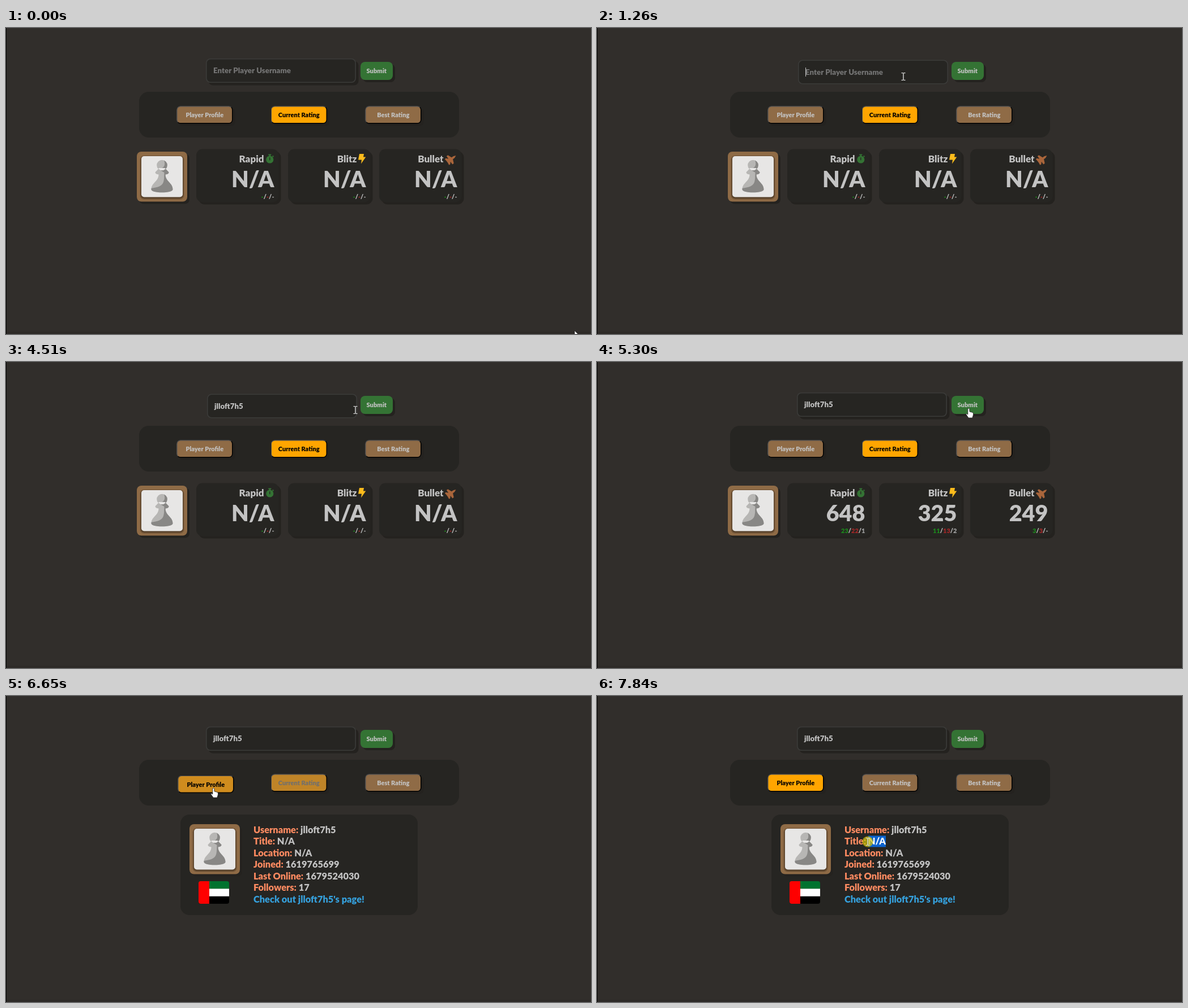
An HTML page with a canvas for the animation above (8000 ms loop, 1033x542 px).

```html
<!DOCTYPE html>
<html lang="en">
<head>
<meta charset="utf-8">
<title>Player ratings</title>
<style>
html, body { margin: 0; width: 100%; height: 100%; overflow: hidden; background: #312e2b; }
canvas { display: block; width: 1033px; height: 542px; }
</style>
</head>
<body>
<canvas id="stage" width="1033" height="542"></canvas>
<script>
const W = 1033, H = 542, LOOP = 8000;
const view = document.getElementById('stage').getContext('2d', { alpha: false, willReadFrequently: true });
let ctx = view;
const USER = 'jlloft7h5';
const PANEL = '#262522', SHADE = '#24221f', LIGHT = '#c3c3c3';
const BROWN = [143, 107, 70], ORANGE = [255, 165, 0], BLACK = [0, 0, 0], GREY = [195, 195, 195];

const KEYS = [2330, 2530, 2660, 2860, 3060, 3190, 3720, 3850, 3980];
const MARKS = [0, 70, 1740, 2200, ...KEYS, 4510];
const FOCUS = 950, BLUR = 4900, RESULT = 5230, SWITCH = 6520, RELEASE = 6720, DRAG = 7450;

// time, x, y
const PATH = [
  [70, 1004, 536], [850, 556, 80], [920, 556, 80], [1260, 541, 86], [1400, 541, 86], [1740, 617, 85],
  [4510, 617, 85], [4840, 656, 82], [5500, 656, 82], [5920, 438, 152], [6250, 366, 163],
  [6720, 366, 163], [7320, 529, 268], [DRAG, 529, 268], [7840, 478, 258]
];

const clamp = v => Math.max(0, Math.min(1, v));
const mix = (a, b, p) => a + (b - a) * p;
const easeOut = p => 1 - (1 - clamp(p)) ** 2;
const easeBoth = p => p * p * (3 - 2 * p);
const blend = (a, b, p) => 'rgb(' + a.map((v, i) => Math.round(mix(v, b[i], p))) + ')';

// paints a still part once and reuses it
const layers = {};
function still(key, paint) {
  if (!layers[key]) {
    const c = document.createElement('canvas');
    c.width = W;
    c.height = H;
    const outer = ctx;
    ctx = c.getContext('2d', { willReadFrequently: true });
    paint();
    ctx = outer;
    layers[key] = c;
  }
  ctx.drawImage(layers[key], 0, 0);
}

function box(x, y, w, h, r, fill) {
  ctx.beginPath();
  ctx.roundRect(x, y, w, h, r);
  ctx.fillStyle = fill;
  ctx.fill();
}

function shadowBox(x, y, w, h, r, fill, drop) {
  if (drop > 0.05) box(x + drop, y + drop, w, h, r, SHADE);
  box(x, y, w, h, r, fill);
}

function poly(points, fill, stroke) {
  ctx.beginPath();
  points.forEach(([x, y]) => ctx.lineTo(x, y));
  ctx.closePath();
  ctx.fillStyle = fill;
  ctx.fill();
  if (stroke) {
    ctx.strokeStyle = stroke;
    ctx.lineWidth = 0.8;
    ctx.stroke();
  }
}

function setFont(size) {
  ctx.font = `900 ${size}px Lato, "Open Sans", sans-serif`;
}

function text(str, x, y, size, fill, align = 'left') {
  setFont(size);
  ctx.textAlign = align;
  ctx.fillStyle = fill;
  ctx.fillText(str, x, y);
  return ctx.measureText(str).width;
}

function drawInput(t) {
  const p = t < BLUR ? easeOut((t - FOCUS) / 260) : 1 - easeOut((t - BLUR) / 260);
  const x = 353 + 2 * p, y = 54 + 2.5 * p;
  shadowBox(x, y, 265, 43, 8, '#3b3b39', 4.5 * (1 - p));
  box(x + 1.6, y + 1.6, 261.8, 39.8, 6.5, PANEL);
  const typed = USER.slice(0, KEYS.filter(k => t >= k).length);
  const tx = x + 13, ty = y + 26.4;
  const w = typed ? text(typed, tx, ty, 13.3, LIGHT) : 0;
  if (!typed) text('Enter Player Username', tx, ty, 13.3, '#757575');
  const caret = t >= FOCUS && t < 1470 || t >= 2200 && t < 4510;
  if (caret) {
    ctx.fillStyle = LIGHT;
    ctx.fillRect(Math.round(tx + w), Math.round(y + 13.5), 1, 16);
  }
}

function drawSubmit(t) {
  const p = t < BLUR + 140 ? easeOut((t - BLUR) / 100) : 1 - easeOut((t - BLUR - 140) / 200);
  const x = 626 + 2 * p, y = 60 + 2.5 * p;
  shadowBox(x, y, 57, 32, 8, '#347334', 4 * (1 - p));
  text('Submit', x + 28.3, y + 20, 11.2, LIGHT, 'center');
}

function drawTab(label, x, y, fill, ink, press) {
  x += 2 * press;
  y += 2.5 * press;
  shadowBox(x, y, 99.5, 31.5, 7, '#000', 4 * (1 - press));
  // bevel: grey on the top and left edges
  ctx.save();
  ctx.beginPath();
  ctx.moveTo(x, y);
  ctx.lineTo(x + 99.5, y);
  ctx.lineTo(x + 95, y + 4);
  ctx.lineTo(x + 4, y + 27.5);
  ctx.lineTo(x, y + 31.5);
  ctx.clip();
  box(x, y, 99.5, 31.5, 7, '#4c4c4c');
  ctx.restore();
  box(x + 1.5, y + 1.5, 96.5, 28.5, 5.5, fill);
  text(label, x + 49.8, y + 20.3, 11, ink, 'center');
}

function drawTabs(t) {
  const p = easeOut((t - SWITCH - 10) / 350);
  const press = t < RELEASE ? easeOut((t - SWITCH) / 90) : 1 - easeOut((t - RELEASE) / 250);
  drawTab('Player Profile', 301, 138, blend(BROWN, ORANGE, p), t < SWITCH ? LIGHT : '#000', press);
  drawTab('Current Rating', 467.5, 138, blend(ORANGE, BROWN, p), blend(BLACK, GREY, p), 0);
}

function pawnShape() {
  ctx.beginPath();
  ctx.arc(0, -20, 9.3, 0, 7);
  ctx.moveTo(-5, -15);
  ctx.lineTo(-12, -7.5);
  ctx.quadraticCurveTo(-12, -4, -6, -3.5);
  ctx.bezierCurveTo(-6, 9, -19, 11, -19, 23);
  ctx.bezierCurveTo(-19, 30, 19, 30, 19, 23);
  ctx.bezierCurveTo(19, 11, 6, 9, 6, -3.5);
  ctx.quadraticCurveTo(12, -4, 12, -7.5);
  ctx.lineTo(5, -15);
}

function drawAvatar(x, y) {
  shadowBox(x, y, 89, 88.5, 8, '#8f6b46', 4);
  for (let g = 3; g >= 0; g--) box(x + 8 - g, y + 9.5 - g, 73 + 2 * g, 72.5 + 2 * g, 5 + g, 'rgba(0,0,0,.13)');
  box(x + 8, y + 8, 73, 72.5, 5, '#e7e6e5');
  ctx.save();
  ctx.translate(x + 44.5, y + 44);
  pawnShape();
  ctx.fillStyle = '#b7b6b4';
  ctx.fill();
  ctx.clip();
  ctx.beginPath();
  ctx.moveTo(3, -30);
  ctx.bezierCurveTo(7, -20, 4, -15, -6, -13);
  ctx.lineTo(4, -7);
  ctx.bezierCurveTo(3, 10, 6, 18, -20, 21);
  ctx.lineTo(-20, 32);
  ctx.lineTo(22, 32);
  ctx.lineTo(22, -30);
  ctx.fillStyle = '#888785';
  ctx.fill();
  ctx.restore();
}

function stopwatch() {
  ctx.fillStyle = '#347334';
  ctx.beginPath();
  ctx.arc(465.8, 233, 6.6, 0, 7);
  ctx.fill();
  ctx.fillRect(463.3, 223.5, 5, 2);
  ctx.fillRect(464.8, 224, 2, 4);
  poly([[470, 227], [471.5, 225.8], [473, 227.5], [471.5, 229]], '#347334');
  ctx.fillStyle = PANEL;
  ctx.fillRect(465.1, 229.2, 1.4, 5);
}

function bolt() {
  poly([[624, 223], [632, 223], [631, 228.5], [635.3, 228.5], [627, 240.5], [628, 233.5], [622, 233.5]], '#fcbb1c');
}

function jet() {
  ctx.save();
  ctx.translate(785.5, 232.5);
  ctx.rotate(-0.62);
  const half = [[11, 0], [7, 1.8], [3, 2], [0, 9], [-3, 9], [-3, 3], [-6, 6.5], [-8.5, 6.5], [-8, 1.5]];
  poly(half.concat(half.slice().reverse().map(([x, y]) => [x, -y])), '#a9653b');
  ctx.restore();
}

function drawRecord(parts, right, y) {
  const inks = ['#1c8a1c', LIGHT, '#a52828', LIGHT, '#a0a0a0'];
  const runs = [parts[0], '/', parts[1], '/', parts[2]];
  setFont(11);
  let x = right - ctx.measureText(runs.join('')).width;
  runs.forEach((s, i) => { x += text(s, x, y, 11, inks[i]); });
}

const CARDS = [
  { x: 336, title: 'Rapid', end: 455.5, icon: stopwatch, score: '648', record: ['23', '22', '1'] },
  { x: 498, title: 'Blitz', end: 619.5, icon: bolt, score: '325', record: ['11', '13', '2'] },
  { x: 659, title: 'Bullet', end: 772.5, icon: jet, score: '249', record: ['3', '3', '-'] }
];

function drawRatings(done) {
  drawAvatar(231, 219);
  for (const c of CARDS) {
    shadowBox(c.x, 214.5, 145.5, 94, 11, PANEL, 4);
    text(c.title, c.end, 238, 17, LIGHT, 'right');
    c.icon();
    text(done ? c.score : 'N/A', c.x + 137.5, 282, 39.6, LIGHT, 'right');
    drawRecord(done ? c.record : ['-', '-', '-'], c.x + 137.5, 303);
  }
}

function drawFlag() {
  ctx.save();
  ctx.beginPath();
  ctx.roundRect(340, 328, 54, 40, 4);
  ctx.clip();
  ['#00732f', '#fff', '#000'].forEach((c, i) => {
    ctx.fillStyle = c;
    ctx.fillRect(340, 328 + i * 13.4, 54, 13.6);
  });
  ctx.fillStyle = '#f00';
  ctx.fillRect(340, 328, 19, 40);
  ctx.restore();
}

const ROWS = [
  ['Username:', USER], ['Title:', 'N/A'], ['Location:', 'N/A'],
  ['Joined:', '1619765699'], ['Last Online:', '1679524030'], ['Followers:', '17']
];

function drawProfile() {
  box(308, 210, 419, 178, 16, PANEL);
  drawAvatar(324, 227);
  drawFlag();
  ROWS.forEach(([label, value], i) => {
    const y = 243 + i * 20.45;
    const w = text(label + ' ', 437, y, 16.4, '#ff8b61');
    text(value, 437 + w, y, 16.4, LIGHT);
  });
  text(`Check out ${USER}'s page!`, 437, 365.5, 16.4, '#35a0dc');
}

function drawSelection(t) {
  setFont(16.4);
  const x = 437 + ctx.measureText('Title: ').width;
  const w = ctx.measureText('N/A').width;
  const left = Math.max(x, cursorAt(t).x);
  if (left >= x + w) return;
  ctx.save();
  ctx.beginPath();
  ctx.rect(left, 247.5, x + w - left, 20);
  ctx.clip();
  ctx.fillStyle = '#0b63ce';
  ctx.fillRect(x, 247, w, 21);
  text('N/A', x, 263.45, 16.4, '#fff');
  ctx.restore();
}

function cursorAt(t) {
  const i = PATH.findIndex(k => t < k[0]);
  const b = i < 0 ? PATH[PATH.length - 1] : PATH[i];
  const a = i > 0 ? PATH[i - 1] : b;
  const p = a === b ? 0 : easeBoth((t - a[0]) / (b[0] - a[0]));
  return { x: mix(a[1], b[1], p), y: mix(a[2], b[2], p) };
}

const inside = (m, x, y, w, h) => m.x >= x && m.x <= x + w && m.y >= y && m.y <= y + h;

function arrow() {
  poly([[0, 0], [0, 13], [3, 10.3], [5, 14.6], [7, 13.7], [5.1, 9.5], [9, 9.3]], '#fff', '#222');
}

function beam() {
  ctx.fillStyle = '#ddd';
  ctx.fillRect(-0.7, -6.5, 1.4, 13);
  for (const y of [-7, 5.8]) {
    ctx.fillRect(-3.5, y, 3, 1.2);
    ctx.fillRect(0.5, y, 3, 1.2);
  }
}

function hand() {
  ctx.beginPath();
  ctx.moveTo(-1.2, 1);
  ctx.quadraticCurveTo(0.3, -1, 1.8, 1);
  ctx.lineTo(2, 6);
  ctx.lineTo(7.5, 7.4);
  ctx.quadraticCurveTo(9, 8.5, 8.4, 12);
  ctx.lineTo(6.8, 17);
  ctx.lineTo(0, 17);
  ctx.lineTo(-4.4, 10.5);
  ctx.quadraticCurveTo(-4, 8.6, -1.2, 11);
  ctx.closePath();
  ctx.fillStyle = '#fff';
  ctx.fill();
  ctx.strokeStyle = '#222';
  ctx.lineWidth = 0.8;
  ctx.stroke();
}

function drawCursor(t) {
  const m = cursorAt(t);
  const overText = inside(m, 353, 54, 267, 45) || t > SWITCH && inside(m, 437, 228, 260, 140);
  const overButton = inside(m, 626, 60, 57, 32) || [301, 467, 634].some(x => inside(m, x, 138, 100, 32));
  ctx.save();
  ctx.translate(m.x, m.y);
  if (t >= DRAG) {
    ctx.beginPath();
    ctx.arc(0, 0, 9.5, 0, 7);
    ctx.fillStyle = 'rgba(205,190,10,.72)';
    ctx.fill();
  }
  (overText ? beam : overButton ? hand : arrow)();
  ctx.restore();
}

function drawBack() {
  ctx.fillStyle = '#312e2b';
  ctx.fillRect(0, 0, W, H);
  ctx.fillStyle = '#2d2a27';
  ctx.fillRect(0, 538, W, 4);
  ctx.fillStyle = '#000';
  ctx.fillRect(0, 0, 1, H);
  box(235, 113, 565, 81, 17, PANEL);
  drawTab('Best Rating', 634, 138, blend(BROWN, BROWN, 0), LIGHT, 0);
}

function draw(t) {
  still('back', drawBack);
  drawInput(t);
  drawSubmit(t);
  drawTabs(t);
  if (t >= SWITCH) still('profile', drawProfile);
  else if (t >= RESULT) still('scores', () => drawRatings(true));
  else still('blank', () => drawRatings(false));
  if (t >= DRAG) drawSelection(t);
  drawCursor(t);
}

// holds the time while nothing moves, so still pictures are not redrawn
function settle(t) {
  if (t >= 70 && t < 1740 || t >= 4510 && t < 7840) return t;
  if (t >= 7840) return 7840;
  return MARKS.filter(m => m <= t).pop();
}

let start, shown = -1;
function tick(now) {
  start ??= now;
  const t = settle((now - start) % LOOP);
  if (t !== shown) draw(shown = t);
  requestAnimationFrame(tick);
}
draw(0);
requestAnimationFrame(tick);
</script>
</body>
</html>
```
